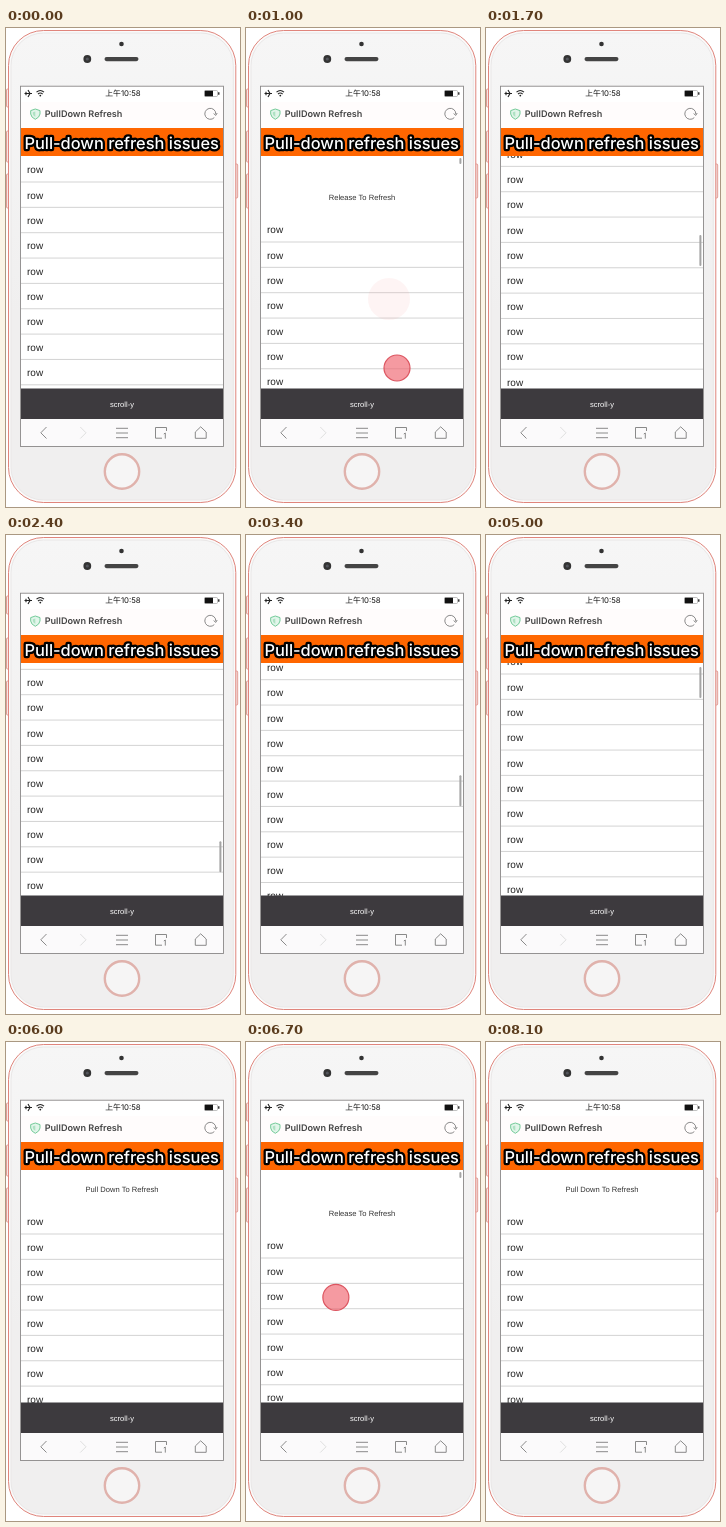
These frames come from a looping animation (234 by 479 pixels, 8.2 s). An HTML page:

```html
<!DOCTYPE html>
<html lang="en">
<head>
<meta charset="utf-8">
<title>Pull-down refresh</title>
<style>
html, body { margin: 0; width: 100%; height: 100%; overflow: hidden; background: #fff; }
svg { display: block; font-family: "Liberation Sans", Arial, sans-serif; text-rendering: geometricPrecision; }
.ui { font-family: Inter, "Noto Sans CJK SC", "Noto Sans CJK", sans-serif; }
.mid { text-anchor: middle; }
.small { font-size: 7.6px; }
.icon { fill: none; stroke: #7d7d7d; stroke-width: .9; }
</style>
</head>
<body>
<svg width="234" height="479" viewBox="0 0 234 479">
  <defs>
    <clipPath id="view"><rect x="15" y="128" width="202" height="233"/></clipPath>
    <linearGradient id="face" x2="0" y2="1">
      <stop stop-color="#f6f6f6"/><stop offset=".6" stop-color="#f0efef"/>
    </linearGradient>
  </defs>

  <!-- phone -->
  <g fill="#f4e6e4" stroke="#dc8880" stroke-width=".8">
    <rect x=".5" y="61" width="3" height="18" rx="1"/>
    <rect x=".5" y="103" width="3" height="31" rx="1"/>
    <rect x=".5" y="146" width="3" height="34" rx="1"/>
    <rect x="228.7" y="136" width="3" height="34" rx="1"/>
  </g>
  <rect x="2.5" y="2.5" width="227.3" height="472" rx="35" fill="#fafafa" stroke="#e0857c"/>
  <rect x="5" y="5" width="222.3" height="467" rx="32.5" fill="url(#face)" stroke="#e9e7e7"/>
  <circle cx="115.5" cy="16" r="2.3" fill="#333"/>
  <circle cx="81.3" cy="31" r="3.9" fill="#333"/>
  <circle cx="81.3" cy="31" r="1.6" fill="#53555c"/>
  <rect x="98.5" y="29" width="34" height="4.2" rx="2.1" fill="#444"/>
  <circle cx="116" cy="443.5" r="17.2" fill="#f6f5f5" stroke="#e0b2ac" stroke-width="2.4"/>
  <rect x="14.5" y="58.2" width="203" height="360.3" fill="#fff" stroke="#8a8888" stroke-width=".9"/>

  <!-- list -->
  <g clip-path="url(#view)">
    <g id="list">
      <text id="label" class="mid small" x="116" y="111.7" fill="#333"></text>
      <g id="rows" font-size="10" fill="#222"></g>
    </g>
    <rect id="thumb" x="213.4" width="2" rx="1" fill="#a4a4a4"/>
  </g>

  <!-- status bar and title -->
  <path d="M18.5 65.5H26M20 63.8V67.2M22 62L24 65.5L22 69" fill="none" stroke="#222" stroke-width="1.1"/>
  <path d="M30.5 64.2Q34.3 60.8 38 64.2M32 66Q34.3 64 36.6 66" fill="none" stroke="#222" stroke-width="1.1"/>
  <circle cx="34.3" cy="67.6" r=".9" fill="#222"/>
  <text class="ui mid" x="117" y="68.4" font-size="7.8" fill="#111">上午10:58</text>
  <rect x="198.5" y="62.5" width="13" height="6" rx="1" fill="#fff" stroke="#999" stroke-width=".6"/>
  <path d="M198.8 62.8H207V68.2H198.8ZM212.2 64.3H213.4V66.7H212.2Z" fill="#111"/>
  <rect x="15" y="74" width="202" height="26" fill="#fffcfc"/>
  <path d="M29.3 81L34 82.6V86Q33.5 89.5 29.3 91.3Q25.1 89.5 24.7 86V82.6Z" fill="#e2f5ea" stroke="#74cb99"/>
  <path d="M29.3 83.5V89Q27 87.8 26.8 85.8V84.3Z" fill="#aee2c3"/>
  <text class="ui" x="38.7" y="89.2" font-size="9.1" font-weight="600" fill="#444">PullDown Refresh</text>
  <path d="M208.3 89.6A5.5 5.5 0 1 1 209.8 86.2M207.6 85.6L209.8 87.4L211.2 85" class="icon"/>

  <rect x="15" y="100" width="202" height="28" fill="#ff6600"/>
  <text class="ui" x="18.4" y="121" font-size="16.4" font-weight="500" fill="#fff" stroke="#000" stroke-width="4.6"
    stroke-linejoin="round" paint-order="stroke">Pull-down refresh issues</text>

  <!-- bottom bars -->
  <rect x="15" y="360.5" width="202" height="30.5" fill="#3d3a3e"/>
  <text class="mid small" x="116" y="379" fill="#fff">scroll-y</text>
  <rect x="15" y="391" width="202" height="27" fill="#fbfafb"/>
  <g class="icon">
    <path d="M40.5 399L34.8 404.8L40.5 410.5"/>
    <path d="M74.3 399L80 404.8L74.3 410.5" stroke="#dcdcdc"/>
    <path d="M110 400.3H122M110 405H122M110 409.7H122"/>
    <path d="M156 410.2H149.5V399.5H160.5V403M157.8 406L159.3 405V410.6"/>
    <path d="M189.3 410.3V404L194.7 398.8L200.2 404V410.3Z"/>
  </g>

  <circle id="ghost" r="21" fill="#f08088"/>
  <circle id="touch" r="13" fill="#f06670" fill-opacity=".66" stroke="#dc5560" stroke-width="1.2"/>
</svg>
<script>
const LOOP = 8200, STEP = 100, ROW = 25.35, TOP = 130, VIEW = 231, CONTENT = 1721;
const $ = id => document.getElementById(id);
const set = (el, attrs) => { for (const k in attrs) el.setAttribute(k, attrs[k]); };

// [time, scroll position]; negative positions are pulled past the top
const scroll = [
  [0, 0], [200, 0], [1000, -60], [1100, -62], [1300, -38], [1500, 160], [1800, 780],
  [2100, 1190], [2400, 1312.5], [2600, 1280], [3400, 820.5], [4400, 213.6], [5000, 15],
  [5300, -44], [5600, -38], [6100, -38], [6800, -66], [7000, -66], [7600, -38], [8200, -38]
];
// [start, end, x0, y0, x1, y1]
const drags = [
  [300, 1000, 143, 271, 151, 340],
  [6200, 7000, 88, 236, 91, 267]
];

const mix = (a, b, p) => a + (b - a) * p;

function position(t) {
  const i = scroll.findIndex(k => k[0] > t);
  const [t0, y0] = scroll[i - 1], [t1, y1] = scroll[i];
  return mix(y0, y1, (t - t0) / (t1 - t0));
}

let rows = "";
for (let i = 0; i < 68; i++) {
  const y = 145.2 + i * ROW;
  rows += `<text x="21" y="${y}">row</text><path d="M15 ${y + 8.8}H217" stroke="#c8c8c8" stroke-width=".8"/>`;
}
$("rows").innerHTML = rows;

function draw(now) {
  const t = Math.floor(now % LOOP / STEP) * STEP;
  const y = position(t), pull = Math.max(0, -y);

  set($("list"), { transform: `translate(0 ${-y})` });
  $("label").textContent = pull > 50 ? "Release To Refresh" : "Pull Down To Refresh";
  set($("thumb"), {
    y: TOP + Math.max(0, y) * VIEW / CONTENT,
    height: Math.max(6, 31 - pull),
    opacity: t >= 300 && t < 5600 || t > 6100 && t < 7600 ? 1 : 0
  });

  const drag = drags.find(d => t >= d[0] && t <= d[1]);
  set($("touch"), { opacity: drag ? 1 : 0 });
  set($("ghost"), { opacity: drag === drags[0] ? .09 : 0 });
  if (drag) {
    const [start, end, x0, y0, x1, y1] = drag, p = (t - start) / (end - start);
    set($("touch"), { cx: mix(x0, x1, p), cy: mix(y0, y1, p) });
    set($("ghost"), { cx: x0, cy: y0 });
  }
  requestAnimationFrame(() => draw(performance.now() - begin));
}
const begin = performance.now();
draw(0);
</script>
</body>
</html>
```
